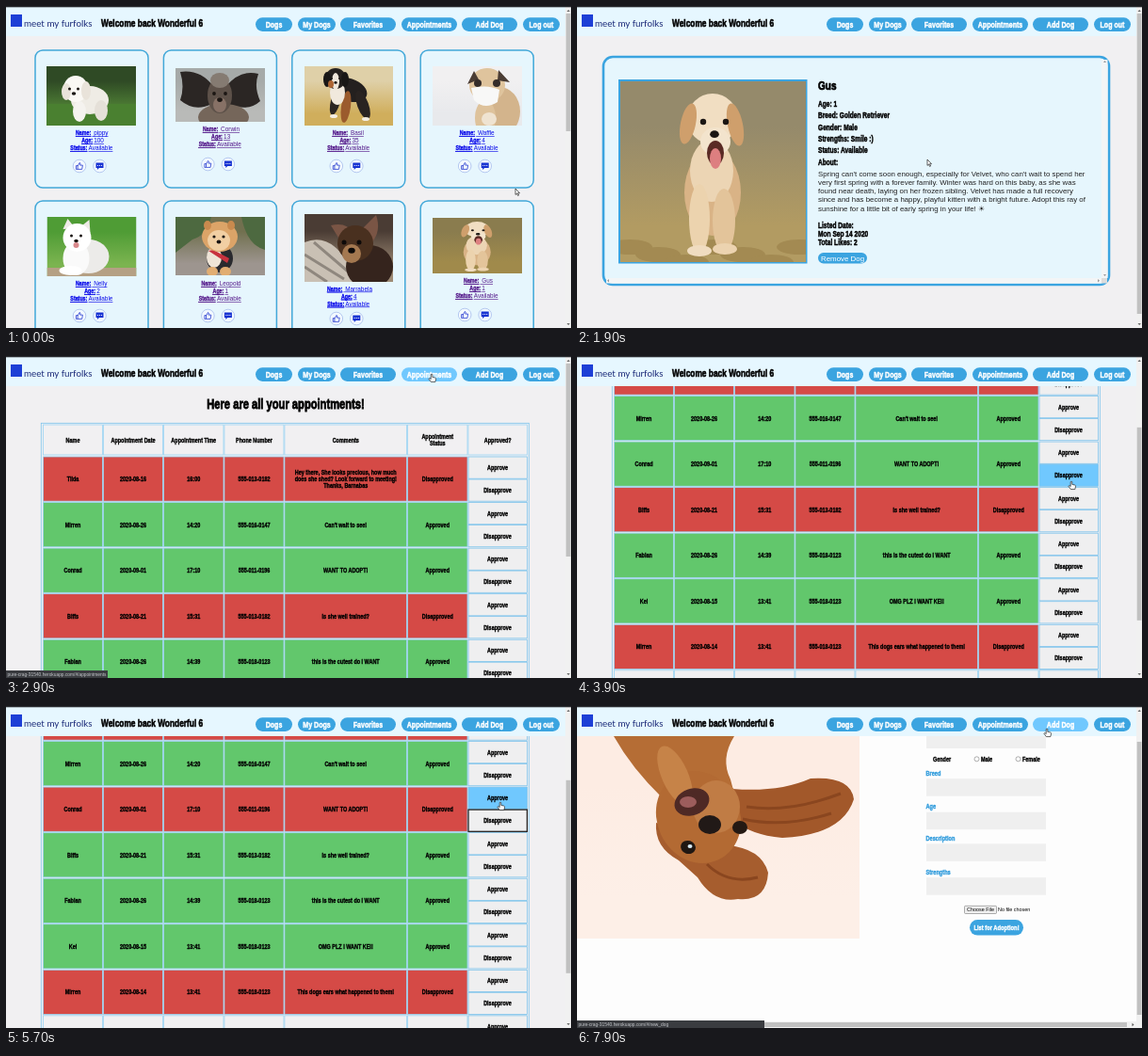
An HTML page that plays this animation: 600x342 px, repeating every 8000 ms.

```html
<!DOCTYPE html>
<html lang="en">
<head>
<meta charset="utf-8">
<title>Dog adoption site</title>
<style>
html, body { margin: 0; width: 100%; height: 100%; overflow: hidden; background: #f1f0f2; }
svg { display: block; }
#stage { width: 600px; height: 342px; }
text { font-family: "Liberation Sans", Arial, sans-serif; white-space: pre; }
.h { font-weight: bold; stroke-width: .055em; }
.u { text-decoration: underline; text-decoration-thickness: .5px; }
.logo { font-family: Lato, sans-serif; }
</style>
</head>
<body>
<svg id="stage" viewBox="0 0 600 342"></svg>
<script>
const LOOP = 8000, BLUE = '#3ba4e0', LIT = '#70c8fe', PALE = '#e6f6fd', PAGE = '#f1f0f2';
const HOST = 'pure-crag-31540.herokuapp.com/#/';

// Drawing helpers
const rect = (x, y, w, h, fill, extra = '') =>
  `<rect x="${x}" y="${y}" width="${w}" height="${h}" fill="${fill}" ${extra}/>`;
const el = (x, y, rx, ry, fill, turn = 0) =>
  `<ellipse cx="${x}" cy="${y}" rx="${rx}" ry="${ry}" fill="${fill}" transform="rotate(${turn} ${x} ${y})"/>`;
const path = (d, fill, extra = '') => `<path d="${d}" fill="${fill}" ${extra}/>`;
const text = (x, y, s, size, fill = '#222', anchor = 'start', cls = '') =>
  `<text x="${x}" y="${y}" font-size="${size}" fill="${fill}" text-anchor="${anchor}" class="${cls}">${s}</text>`;
// Condensed heavy display face
const head = (x, y, s, size, fill = '#000', anchor = 'start', cls = '') =>
  `<text transform="translate(${x} ${y}) scale(.76 1)" font-size="${size}" fill="${fill}" stroke="${fill}"
    text-anchor="${anchor}" class="h ${cls}">${s}</text>`;
const pill = (x, y, w, h, fill) => rect(x, y, w, h, fill, `rx="${h / 2}"`);
let grads = 0;
const photo = (x, y, w, h, top, low, art) => {
  const id = 'g' + grads++;
  return `<svg x="${x}" y="${y}" width="${w}" height="${h}" viewBox="0 0 ${w} ${h}">
    <linearGradient id="${id}" x2="0" y2="1"><stop offset=".25" stop-color="${top}"/><stop offset=".8" stop-color="${low}"/></linearGradient>
    ${rect(0, 0, w, h, `url(#${id})`)}${art}</svg>`;
};
const face = (x, y, gap, r, ink = '#1b1613') =>
  el(x - gap, y, r, r, ink) + el(x + gap, y, r, r, ink) + el(x, y + gap * 1.1, r * 1.5, r * 1.2, ink);

const smooth = k => { k = Math.max(0, Math.min(1, k)); return k * k * (3 - 2 * k); };

// Photographs as flat shapes
const retriever =
  el(98, 118, 30, 46, '#d9b386') + el(97, 95, 23, 33, '#ecd5b4') +
  el(84, 146, 11, 37, '#ecd3ae') + el(110, 148, 12, 34, '#e3c49a') +
  el(84, 180, 13, 6, '#f0dcc0') + el(111, 178, 13, 6, '#ecd3b0') +
  el(98, 40, 27, 27, '#f1dec2') + el(72, 45, 8, 22, '#cf9f6c', 12) + el(122, 46, 8, 23, '#cf9f6c', -12) +
  el(101, 64, 16, 15, '#f3e4cd') + el(101, 76, 9, 13, '#5a2a24') + el(101, 82, 6, 11, '#dd7f80') +
  face(100, 43, 12, 3.2);
const puppyCard = `<g transform="scale(.482 .307)">${retriever}</g>`;
const grass = [0, 1, 2, 3, 4, 5, 6].map(i => el(10 + i * 30, 176 + i % 3 * 8, 24, 8, '#a38a52')).join('');

const art = {
  bichon: rect(0, 40, 95, 23, '#4a8030') + el(46, 36, 20, 15, '#efece5') + el(58, 47, 7, 11, '#e5e0d8') +
    el(35, 48, 7, 11, '#f5f3ef') + el(31, 24, 13, 14, '#faf8f4') + el(21, 27, 5, 9, '#e9e3da') +
    el(42, 26, 5, 10, '#e9e3da') + face(29, 24, 4.5, 1.5),
  crested: path('M40 19Q26 1 5 4Q10 20 5 34Q20 47 39 38ZM54 19Q69 1 88 6Q83 20 90 35Q77 47 56 38Z', '#2b2624') +
    el(51, 52, 27, 14, '#75665a') + el(47, 29, 13, 19, '#5d5149') + el(47, 13, 10, 8, '#857b72') +
    el(47, 39, 7, 8, '#877166') + face(47, 27, 6, 1.9),
  mountain: el(47, 25, 20, 12, '#24201f', 18) + el(62, 41, 6, 16, '#292321', -20) + el(44, 43, 5, 17, '#9b5b2d', 8) +
    el(33, 37, 5, 15, '#2b2522', 15) + el(35, 28, 8, 13, '#f1e9dd') + el(33, 13, 11, 11, '#25211f') +
    el(24, 14, 4, 8, '#191716') + el(43, 14, 4, 8, '#191716') + el(33, 16, 4, 9, '#f0e7dc') +
    el(28, 19, 3, 4, '#ad6534') + face(33, 13, 4, 1.1) + el(65, 56, 4, 2, '#f4ede2') + el(31, 53, 4, 2, '#f4ede2'),
  pug: el(71, 48, 22, 26, '#d3b48c') + el(56, 55, 11, 19, '#dec29b') + el(58, 20, 19, 18, '#dfc49d') +
    path('M44 5L37 19L49 14ZM70 4L82 17L69 15Z', '#4a3c34') + el(48, 18, 4, 4, '#342c29') +
    el(68, 18, 4, 4, '#342c29') + path('M41 23Q58 19 71 25L69 38Q55 47 44 36Z', '#f8f8f7') + el(60, 56, 8, 7, '#efe3d1'),
  samoyed: rect(0, 54, 95, 9, '#b5a084') + el(44, 42, 22, 18, '#ecebe9') + el(31, 44, 14, 18, '#fafafa') +
    path('M17 13L22 2L30 12ZM35 11L45 3L46 17Z', '#eeeae7') + el(32, 22, 15, 15, '#fff') +
    el(25, 57, 12, 5, '#fff') + face(31, 20, 5, 1.5) + el(31, 30, 3, 3, '#d9898c'),
  pomeranian: path('M0 0H38Q34 19 18 24L0 38ZM70 0H95V35Q76 30 70 0Z', '#4d6940') + el(47, 44, 14, 15, '#2a2a2e') +
    el(41, 43, 8, 11, '#eee4d6') + el(39, 58, 6, 5, '#e1ad72') + el(53, 58, 6, 5, '#e1ad72') +
    path('M35 36L55 49L57 44L40 35Z', '#c8323e') + el(47, 21, 19, 16, '#dca468') + el(46, 25, 12, 11, '#f1cfa3') +
    el(34, 9, 4, 5, '#c98a4e') + el(59, 9, 4, 5, '#c98a4e') + face(46, 21, 5, 1.6),
  brown: path('M0 30Q24 20 42 46L60 72H0Z', '#c9c0b4') + path('M0 43L42 69M0 56L24 72M10 30L52 66', 'none', 'stroke="#8f877e" stroke-width="3"') +
    el(69, 56, 25, 23, '#35241d') + path('M39 30L28 12Q45 8 51 20ZM60 17L76 1Q82 18 71 31Z', '#7a5545') +
    el(54, 31, 19, 19, '#49301f') + el(50, 42, 10, 10, '#a47850') + face(50, 30, 8, 2.5, '#0d0a09')
};

const dogPhotos = [
  photo(43, 64, 95, 63, '#2f4a25', '#558a38', art.bichon),
  photo(180, 66, 95, 57, '#a6aaa9', '#b9bab8', art.crested),
  photo(317, 64, 94, 63, '#dfd0a8', '#d0ae5c', art.mountain),
  photo(453, 64, 95, 63, '#f1f0f1', '#e8e9ec', art.pug),
  photo(43.5, 224, 95, 63, '#4f9c35', '#7bb450', art.samoyed),
  photo(180, 224, 95, 62, '#71704f', '#9d958f', art.pomeranian),
  photo(317, 221, 94, 72, '#4a3c34', '#9d8a75', art.brown),
  photo(453, 225, 95, 59, '#8a7c4e', '#a08a4b', puppyCard)
];
const bigPhoto = photo(46, 80, 197, 192, '#958a6b', '#b29b62', grass + retriever);
const flippedPhoto = photo(0, 32, 300, 215, '#fdece3', '#fdefe7',
  path('M39 0H167Q152 24 163 46L172 80L86 98L91 66Q58 34 39 0Z', '#b56d35') +
  path('M165 56Q214 60 248 45Q291 42 294 67Q282 105 218 108Q184 105 164 88Z', '#a2582a') +
  path('M84 92Q82 118 108 132L128 150Q145 178 171 173Q201 176 203 145Q196 119 159 116Z', '#a65d2e') +
  el(129, 86, 44, 50, '#b36a33', -25) + el(148, 75, 25, 28, '#c07c45') + el(104, 42, 14, 34, '#c68348', -24) +
  path('M180 75Q225 82 280 61M176 88Q220 98 270 82M138 136Q160 158 192 150', 'none', 'stroke="#8a461f" stroke-width="3"') +
  el(122, 70, 19, 14, '#4e2925', -20) + el(118, 70, 9, 6, '#9c5d5c') + el(141, 94, 12, 10, '#211917') +
  el(118, 118, 8, 7, '#201712', 18) + el(120, 117, 2.5, 2, '#d9eaf2') + el(173, 97, 8, 7, '#241913'));

// Content
const nav = [['Dogs', 265, 39], ['My Dogs', 310, 40], ['Favorites', 355, 59], ['Appointments', 420, 59], ['Add Dog', 484, 59], ['Log out', 549, 39]];
const navLinks = ['dogs', 'my_dogs', 'favorites', 'appointments', 'new_dog', ''];
// name, age, photo bottom, icon line, visited
const dogs = [
  ['pippy', 100, 127, 170, 0], ['Corwin', 13, 123, 168, 1], ['Basil', 35, 127, 170, 1], ['Waffle', 4, 127, 170, 0],
  ['Nelly', 2, 287, 329, 0], ['Leopold', 1, 287, 329, 1], ['Marrabela', 4, 292.5, 332, 0], ['Gus', 1, 284, 328, 1]];
const facts = ['Age: 1', 'Breed: Golden Retriever', 'Gender: Male', 'Strengths: Smile :)', 'Status: Available', 'About:'];
const about = [
  "Spring can't come soon enough, especially for Velvet, who can't wait to spend her",
  'very first spring with a forever family. Winter was hard on this baby, as she was',
  'found near death, laying on her frozen sibling. Velvet has made a full recovery',
  'since and has become a happy, playful kitten with a bright future. Adopt this ray of',
  'sunshine for a little bit of early spring in your life! ☀\uFE0E'];
const phones = ['555-013-0182', '555-016-0147', '555-011-0196', '555-018-0123'];
const visits = [
  ['Tilda', '2020-08-16', '16:00', 0, 'Hey there, She looks precious, how much|does she shed? Look forward to meeting!|Thanks, Barnabas', 0],
  ['Mirren', '2020-08-26', '14:20', 1, "Can't wait to see!", 1],
  ['Conrad', '2020-09-01', '17:10', 2, 'WANT TO ADOPT!', 1],
  ['Biffs', '2020-08-21', '15:31', 0, 'Is she well trained?', 0],
  ['Fabian', '2020-08-26', '14:39', 3, 'this is the cutest do I WANT', 1],
  ['Kei', '2020-08-15', '13:41', 3, 'OMG PLZ I WANT KEI!', 1],
  ['Mirren', '2020-08-14', '13:41', 3, 'This dogs ears what happened to them!', 0],
  null];
const cols = [39, 103, 167, 231.5, 295.5, 426, 490.5, 554];
const titles = ['Name', 'Appointment Date', 'Appointment Time', 'Phone Number', 'Comments', 'Appointment|Status', 'Approved?'];

// Timeline
const moves = [
  [0, 541, 194], [200, 541, 194], [700, 360, 125], [1000, 360, 125], [1400, 498, 255], [1600, 498, 255],
  [1900, 372, 163], [2100, 372, 163], [2600, 452, 19], [3000, 452, 19], [3600, 525, 133], [3900, 525, 133],
  [4200, 524, 148], [4500, 524, 148], [4900, 524, 122], [5200, 524, 122], [5500, 525, 102], [6300, 525, 102],
  [7100, 512, 42], [7350, 499, 24], [8000, 499, 24]];
// time, row, button (0 approve, 1 disapprove)
const clicks = [[4400, 3, 0], [5100, 2, 1], [6100, 2, 0]];
const pageAt = t => t < 1600 ? 'dogs' : t < 2800 ? 'detail' : t < 7500 ? 'visits' : 'form';
const scrollAt = t => 118 * smooth((t - 3200) / 800);
const rowY = i => 107 + i * 48.55;
const cardBox = i => [31 + i % 4 * 136.4, i < 4 ? 47 : 207, 120, 146];

function pointer(t) {
  const i = Math.max(1, moves.findIndex(m => m[0] > t));
  const [t0, x0, y0] = moves[i - 1], [t1, x1, y1] = moves[i], k = smooth((t - t0) / (t1 - t0));
  return [x0 + (x1 - x0) * k, y0 + (y1 - y0) * k];
}

function hover(t) {
  const [px, py] = pointer(t), page = pageAt(t);
  const inside = (x, y, w, h) => px >= x && px <= x + w && py >= y && py <= y + h;
  const n = nav.findIndex(([, x, w]) => inside(x, 12, w, 15));
  if (n >= 0) return 'nav' + n;
  if (page == 'dogs') {
    const c = dogs.findIndex((_, i) => inside(...cardBox(i)));
    if (c >= 0) return 'card' + c;
  }
  if (page == 'visits' && py > 32) for (let i = 0; i < 8; i++) for (const b of [0, 1])
    if (inside(491, rowY(i) + b * 24 - scrollAt(t), 63, 23.5)) return `row${i}-${b}`;
  return '';
}

// Page parts
const scrollbar = (y, h) => rect(594, 1, 6, 341, '#f1f1f1') + rect(594.7, y, 4.8, h, '#c1c1c1') +
  path('M595.5 6l1.7-2 1.7 2zM595.5 337l1.7 2 1.7-2z', '#666');

function header(over) {
  return rect(0, 0, 594, 32, '#e6f7ff') + rect(5, 9, 12, 13, '#1d3fd6') +
    text(19, 22, 'meet my furfolks', 9.8, '#1b2a78', 'start', 'logo') +
    head(101, 22, 'Welcome back Wonderful 6', 11) +
    nav.map(([s, x, w], i) => pill(x, 12.3, w, 14.6, over == 'nav' + i ? LIT : BLUE) +
      head(x + w / 2, 22.8, s, 9.3, '#fff', 'middle')).join('');
}

const icons = (x, y) => [x - 13, x + 8.5].map(cx =>
  `<circle cx="${cx}" cy="${y}" r="6.8" fill="#f3faff" stroke="#9cb4ea" stroke-width=".7"/>`).join('') +
  `<g transform="translate(${x - 13} ${y})">${path('M-3.6-.4h1.7v3.8h-1.7zM-1.9 0L.1-3.6q1.4 0 .6 2.7h2.7l-.7 4.3h-4.6', 'none', 'stroke="#2438cf" stroke-width=".8"')}</g>` +
  `<g transform="translate(${x + 8.5} ${y})">${path('M-4-3.4h8v5.4h-4.6l-2 2v-2H-4z', '#1631d2')}${[-2, 0, 2].map(d => el(d, -.7, .6, .6, '#fff')).join('')}</g>`;

function card(i, grow) {
  const [x, y, w, h] = cardBox(i), [name, age, base, iconY, seen] = dogs[i];
  const cx = x + w / 2, cy = y + h / 2, ink = seen ? '#551a8b' : '#0b0bea';
  const lines = [['Name:', '\u00a0' + name, 17], ['Age:', '' + age, 12], ['Status:', 'Available', 18]];
  return `<g transform="translate(${cx} ${cy}) scale(${1 + .05 * grow}) translate(${-cx} ${-cy})">` +
    rect(x, y, w, h, PALE, 'rx="8" stroke="#42a8d9" stroke-width="1.5"') + dogPhotos[i] +
    lines.map(([label, value, lw], n) => {
      const split = cx + (lw - value.length * 2.9) / 2, by = base + 10 + n * 8;
      return head(split - .6, by, label, 7, ink, 'end', 'u') + text(split + .6, by, value, 6.4, ink, 'start', 'u');
    }).join('') + icons(cx, iconY) + '</g>';
}

function dogsPage(t) {
  const recent = [0, 1, 2, 3, 4, 5, 6, 7].map(n => hover(Math.max(0, t - n * 25)));
  return dogs.map((_, i) => card(i, recent.filter(o => o == 'card' + i).length / 8)).join('') + scrollbar(8, 125);
}

const detailPage = rect(28, 54, 537, 242, PALE, `rx="10" stroke="${BLUE}" stroke-width="2.6"`) +
  rect(557, 57, 6.5, 232, '#f3f5f6') + rect(31, 289, 526, 5.5, '#f3f5f6') + rect(557, 289, 6, 5.5, '#dcdcdc') +
  path('M559 60l1.5-2 1.5 2zM559 285l1.5 2 1.5-2zM34 290l-2 1.7 2 1.7zM553 290l2 1.7-2 1.7z', '#999') +
  rect(45, 79, 198.5, 193.5, BLUE, `stroke="${BLUE}" stroke-width="2"`) + bigPhoto +
  head(256, 89, 'Gus', 13.2) + facts.map((s, i) => head(256, 107 + i * 12.35, s, 8.7)).join('') +
  about.map((s, i) => text(256, 180.8 + i * 9.2, s, 7.87)).join('') +
  ['Listed Date:', 'Mon Sep 14 2020', 'Total Likes: 2'].map((s, i) => head(256, 235.7 + i * 9.3, s, 8.7)).join('') +
  pill(256, 262, 52, 11.5, BLUE) + text(282, 270.6, 'Remove Dog', 7.9, '#fff', 'middle') + scrollbar(8, 319);

function cell(c, y, h, s, fill) {
  const lines = s.split('|'), x = cols[c], w = cols[c + 1] - x;
  return rect(x + .4, y, w - .9, h, fill, 'stroke="#9ad4f3" stroke-width=".8"') +
    lines.map((l, i) => head(x + w / 2, y + h / 2 + 2.5 + (i - (lines.length - 1) / 2) * 6.7, l, 7.2, '#000', 'middle')).join('');
}

function visitsPage(t, over) {
  const done = clicks.filter(c => c[0] <= t), last = done[done.length - 1], s = scrollAt(t);
  const rows = visits.map((v, i) => {
    const y = rowY(i), mine = done.filter(c => c[1] == i).pop();
    const ok = mine ? !mine[2] : v && v[5];
    const fill = !v ? PAGE : ok ? '#62c76c' : '#d54a46';
    const texts = v ? [v[0], v[1], v[2], phones[v[3]], v[4], ok ? 'Approved' : 'Disapproved'] : Array(6).fill('');
    const buttons = ['Approve', 'Disapprove'].map((label, b) => {
      const focus = last && last[1] == i && last[2] == b;
      return rect(491, y + b * 24, 62.4, 23.2, over == `row${i}-${b}` ? LIT : '#efeff0',
        `stroke="${focus ? '#222' : '#7cc3ec'}" stroke-width="${focus ? 1.3 : .8}"`) +
        head(522, y + b * 24 + 14, label, 7.2, '#000', 'middle');
    });
    return texts.map((s, c) => cell(c, y, 47.2, s, fill)).join('') + buttons.join('');
  }).join('');
  return `<g transform="translate(0 ${-s})">` + head(297, 56, 'Here are all your appointments!', 14.7, '#000', 'middle') +
    rect(37.3, 71.3, 518, 430, 'none', 'stroke="#7cc3ec" stroke-width=".8"') +
    titles.map((s, c) => cell(c, 73, 32, s, PAGE)).join('') + rows + '</g>' + scrollbar(8 + s * .6, 205);
}

const radio = (x, s) => `<circle cx="${x}" cy="56.3" r="2.5" fill="#fff" stroke="#777" stroke-width=".6"/>` + head(x + 4.5, 58.7, s, 7.2);
const formPage = rect(0, 32, 594, 310, '#fdfdfd') + flippedPhoto + rect(371, 32, 127, 13, '#efefef') +
  head(378, 58.7, 'Gender', 7.2) + radio(424.5, 'Male') + radio(468.5, 'Female') +
  [['Breed', 73.5], ['Age', 109], ['Description', 142.6], ['Strengths', 178.5]].map(([s, y]) =>
    head(370.5, y, s, 7.4, '#2f9bdc') + rect(371, y + 3.7, 127, 18.5, '#efefef')).join('') +
  rect(411.5, 212.3, 34, 8.2, '#efefef', 'rx="1" stroke="#777" stroke-width=".6"') +
  text(428.5, 218.4, 'Choose File', 5.4, '#000', 'middle') + text(447, 218.4, 'No file chosen', 5.4, '#000') +
  pill(417, 227, 57, 16.6, BLUE) + head(445.5, 238, 'List for Adoption!', 7.6, '#fff', 'middle') +
  scrollbar(38, 290) + rect(0, 335, 600, 7, '#f1f1f1') + rect(7, 336, 577, 5, '#c1c1c1') + path('M589.5 336.7l2 1.8-2 1.8z', '#555');

function statusBar(over) {
  const n = +over.slice(3, 4);
  const [link, w] = over.startsWith('card') ? ['dogs/5f38ca52339b2773f8ba2eb3', 150]
    : over.startsWith('nav') ? [navLinks[n], n == 4 ? 199 : 108] : [];
  return w ? rect(0, 334, w, 8, '#3a3c40') + text(1.5, 340, HOST + link, 4.85, '#c4c7cb') : '';
}

function cursor([x, y], hand) {
  const d = hand
    ? 'M-.8 .6q.8-1 1.6 0V3.4l3 .7q.9.4.7 1.5L3.8 8.6H-.6L-3 5.4q.2-1 1.2-.6l1 .8z'
    : 'M0 0V6.4L1.5 5.1 2.6 7.5 3.6 7 2.5 4.7H4.5Z';
  return `<g transform="translate(${x} ${y})">${path(d, '#fff', 'stroke="#222" stroke-width=".7"')}</g>`;
}

function view(t) {
  const page = pageAt(t), over = hover(t);
  const body = page == 'dogs' ? dogsPage(t) : page == 'detail' ? detailPage : page == 'visits' ? visitsPage(t, over) : formPage;
  return rect(0, 0, 600, 342, PAGE) + body + header(over) + rect(0, 0, 600, 1.3, '#25272b') +
    statusBar(over) + cursor(pointer(t), over);
}

const stage = document.getElementById('stage'), start = performance.now();
let shown = '';
function tick() {
  const next = view((performance.now() - start) % LOOP);
  if (next != shown) stage.innerHTML = shown = next;
  requestAnimationFrame(tick);
}
tick();
</script>
</body>
</html>
```
